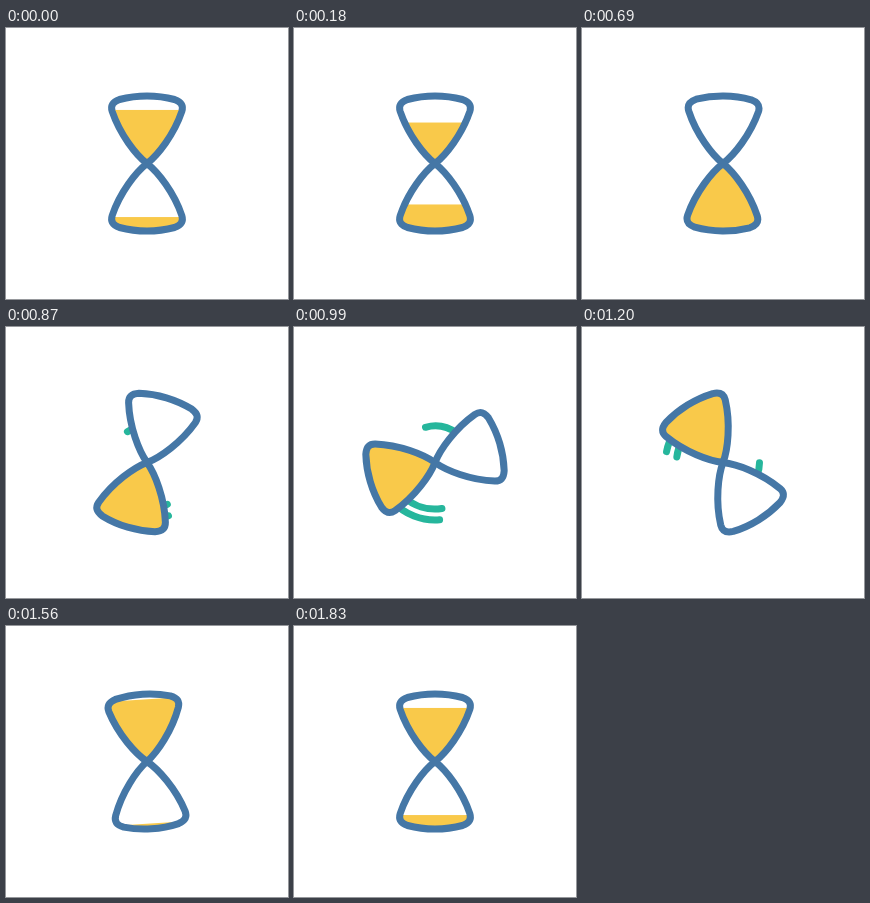
Animation of 282 by 271 pixels, one loop 1860 ms. Source, as an HTML page:

```html
<!DOCTYPE html>
<html lang="en">
<head>
<meta charset="utf-8">
<title>Hourglass</title>
<style>
  html, body { margin: 0; width: 100%; height: 100%; overflow: hidden; background: #fff; }
  svg { display: block; width: 100vw; height: 100vh; }
  .glass { fill: #fff; }
  .sand { fill: #f9c94a; }
  .rim { fill: none; stroke: #4577a6; stroke-width: 7; stroke-linejoin: round; }
  .trail { fill: none; stroke: #26b69c; stroke-width: 7; stroke-linecap: round; }
</style>
</head>
<body>
<svg viewBox="0 0 282 271">
  <defs>
    <path id="bulb" d="M0 0C-11-8.5-27-29-34.8-52C-37-59-33-62-27.5-64C-18-66.5-9-67.5 0-67.5S18-66.5 27.5-64C33-62 37-59 34.8-52C27-29 11-8.5 0 0Z"/>
    <clipPath id="upper"><use href="#bulb"/></clipPath>
    <clipPath id="lower"><use href="#bulb" transform="scale(1 -1)"/></clipPath>
  </defs>
  <g transform="translate(141 135.5)">
    <g id="trails">
      <path class="trail"/>
      <path class="trail"/>
      <path class="trail"/>
    </g>
    <g id="hourglass">
      <use class="glass" href="#bulb"/>
      <use class="glass" href="#bulb" transform="scale(1 -1)"/>
      <g clip-path="url(#upper)"><rect id="source" class="sand" x="-40" width="80"/></g>
      <g clip-path="url(#lower)"><rect id="pile" class="sand" x="-40" width="80" height="70"/></g>
      <use class="rim" href="#bulb"/>
      <use class="rim" href="#bulb" transform="scale(1 -1)"/>
    </g>
  </g>
</svg>
<script>
  const LOOP = 1860, CYCLE = 1830, STEP = 30;
  const SAND_START = 1309, DEPTH = 64, LAG = 100;
  const TRAILS = [
    { radius: 36.5, start: 233.5 },
    { radius: 46.5, start: 60 },
    { radius: 57.5, start: 64 }
  ];

  const find = id => document.getElementById(id);
  const hourglass = find('hourglass'), source = find('source'), pile = find('pile');
  const trails = find('trails');

  // Same curve as cubic-bezier(x1, 0, x2, 1)
  function ease(x, x1, x2) {
    if (x <= 0) return 0;
    if (x >= 1) return 1;
    let low = 0, high = 1;
    for (let i = 0; i < 30; i++) {
      const s = (low + high) / 2, r = 1 - s;
      if (3 * x1 * s * r * r + 3 * x2 * s * s * r + s * s * s < x) low = s;
      else high = s;
    }
    return low * low * (3 - 2 * low);
  }

  const turn = t => 180 * ease((t - 630) / 1200, 0.52, 0);
  const drained = t => ease((t - SAND_START) / 1151, 0.784, 0.7);

  function polar(radius, degrees) {
    const a = degrees * Math.PI / 180;
    return `${(radius * Math.cos(a)).toFixed(2)} ${(radius * Math.sin(a)).toFixed(2)}`;
  }

  function draw(t) {
    const angle = turn(t), tail = turn(t - LAG);
    // Once the next pour begins, the full bulb counts as the upper one
    const pouring = t >= SAND_START;
    const p = drained(pouring ? t : t + CYCLE);

    hourglass.setAttribute('transform', `rotate(${pouring ? angle - 180 : angle})`);
    source.setAttribute('y', -DEPTH * (1 - p));
    source.setAttribute('height', DEPTH * (1 - p));
    pile.setAttribute('y', DEPTH * (1 - p));

    trails.style.display = angle > 3 && angle < 175.5 ? '' : 'none';
    TRAILS.forEach(({ radius, start }, i) => {
      const from = polar(radius, start + tail), to = polar(radius, start + angle);
      trails.children[i].setAttribute('d', `M${from}A${radius} ${radius} 0 0 1 ${to}`);
    });
  }

  const begin = performance.now();
  function tick() {
    const t = (performance.now() - begin) % LOOP;
    draw(Math.floor(t / STEP) * STEP);
    requestAnimationFrame(tick);
  }
  tick();
</script>
</body>
</html>
```
